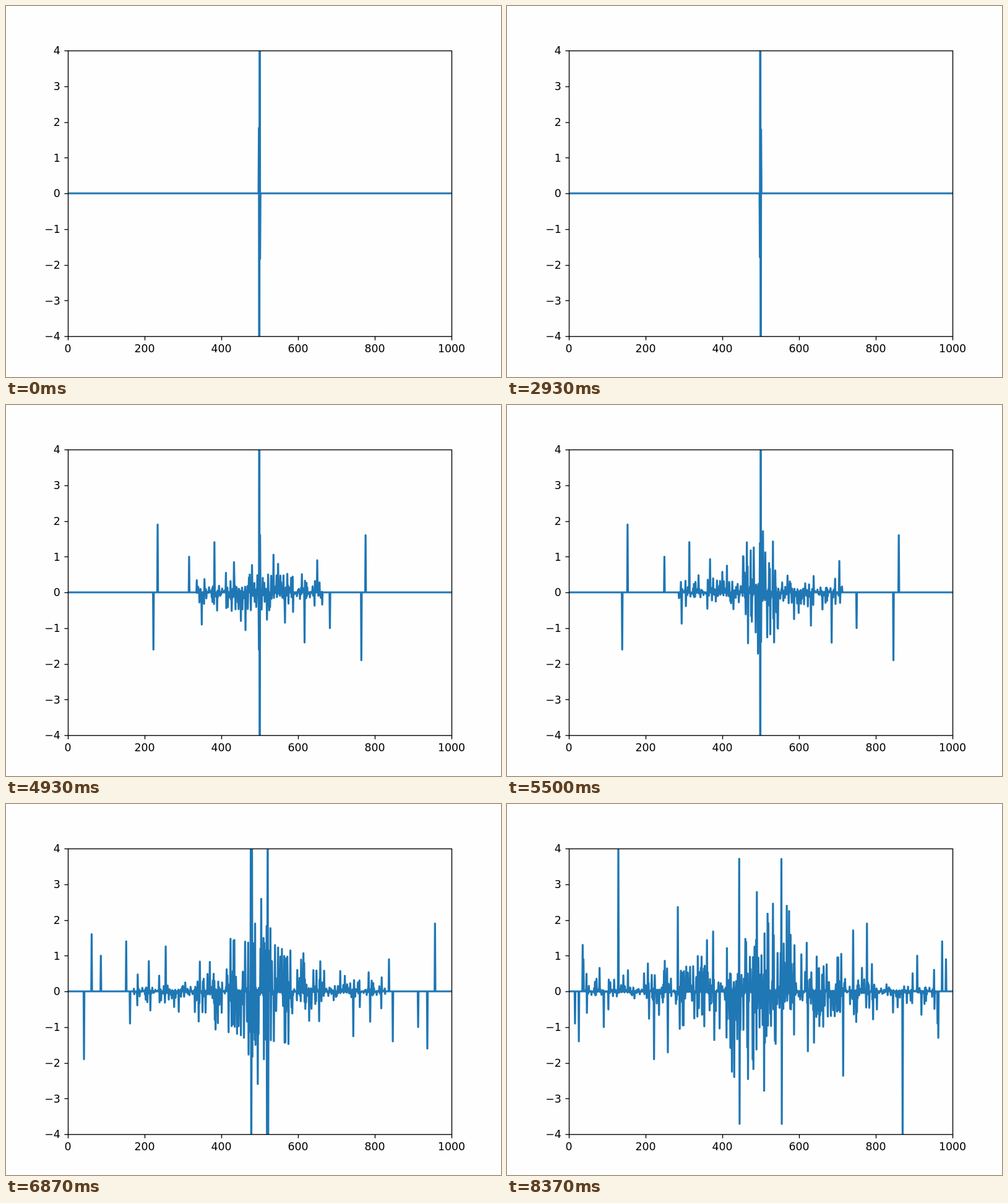
Recreate the animation shown at these times as an HTML page. Size 800 by 600 pixels, loop 8.41 s.

```html
<!DOCTYPE html>
<html lang="en">
<head>
<meta charset="utf-8">
<title>Lattice wave</title>
<style>
  html, body { margin: 0; width: 100%; height: 100%; overflow: hidden; background: #fefefe; }
  svg { display: block; width: 800px; height: 600px; }
  text { font: 17.36px "DejaVu Sans", sans-serif; fill: #000; }
  .axis { fill: none; stroke: #000; stroke-width: 1.39; }
  #wave { fill: none; stroke: #1f77b4; stroke-width: 3.2; stroke-linejoin: round; }
</style>
</head>
<body>
<svg viewBox="0 0 800 600">
  <clipPath id="plot"><rect x="100" y="72" width="620" height="462"/></clipPath>
  <g id="ticks"></g>
  <path id="wave" clip-path="url(#plot)"/>
  <rect class="axis" x="100.5" y="72.5" width="620" height="462"/>
</svg>
<script>
const LOOP = 8410, STEPS = 252, SITES = 1000;
const ONSET = 3, SPLIT = 5.9;
const px = x => 100 + x * 0.62;
const py = y => 303 - y * 57.75;
const crisp = v => Math.round(v) + 0.5;

// Pulses leave the centre at a time (s) with a speed (sites/s) and a height.
const pulses = [
  { born: 3.06, speed: 148, height: -1.6 },
  { born: 3.08, speed: 143.5, height: 1.9 },
  { born: 3.38, speed: 97, height: -0.9 },
  { born: 3.39, speed: 119, height: 1 },
  { born: 3.94, speed: 119, height: 1.4 },
  { born: 4.35, speed: 115, height: 0.9 },
  { born: 5.19, speed: 146, height: 1.3 },
  { born: 6.71, speed: 168, height: -1.9 },
  { born: 6.78, speed: 234, height: 4.1 }
];

function random(n) {
  const s = Math.sin(n * 12.9898 + 78.233) * 43758.5453;
  return s - Math.floor(s);
}

function wave(step) {
  const t = step / 30;
  const y = new Float64Array(SITES);
  // The lattice is a ring, and its right half is the left half turned by 180 degrees.
  const add = (site, height) => {
    const i = ((Math.round(site) % SITES) + SITES) % SITES;
    y[i] += height;
    y[SITES - 1 - i] -= height;
  };

  // Noise spreads from the centre, alternating in sign from site to site.
  const age = Math.max(0, t - ONSET);
  const reach = Math.min(500, 85 * age);
  for (let d = 0; d < reach; d++) {
    const u = random(d - 3 * step);
    const core = (1 + 0.4 * age) * Math.exp(-d / (30 + 18 * age)) * u ** 4;
    const stray = 0.12 * age * u ** 16;
    add(499 - d, (d % 2 ? 1 : -1) * (core + stray));
  }

  for (const { born, speed, height } of pulses) {
    const distance = speed * (t - born);
    if (distance > 8) add(500 - distance, height);
  }

  // The central oscillation later splits into two that drift apart.
  const swing = Math.cos(1.6803 * step);
  if (t < SPLIT) {
    add(499, -11 * swing);
    add(498, 11 / 6 * swing);
  } else {
    const size = Math.sign(swing) * (6 - (t - SPLIT));
    const centre = 499 - 22 * (t - SPLIT);
    add(centre, -size);
    add(centre - 1, size);
  }
  return y;
}

function drawTicks() {
  let markup = "";
  for (let x = 0; x <= 1000; x += 200) {
    markup += `<path class="axis" d="M${crisp(px(x))} 534.5v6.08"/><text x="${px(x)}" y="560" text-anchor="middle">${x}</text>`;
  }
  for (let y = -4; y <= 4; y++) {
    const label = String(y).replace("-", "\u2212");
    markup += `<path class="axis" d="M100.5 ${crisp(py(y))}h-6.08"/><text x="87.9" y="${Math.round(py(y) + 6.3)}" text-anchor="end">${label}</text>`;
  }
  document.getElementById("ticks").innerHTML = markup;
}

const line = document.getElementById("wave");
let shown = -1;

function render(ms) {
  const step = Math.min(STEPS - 1, Math.floor((ms % LOOP + 5) * 0.03));
  if (step === shown) return;
  shown = step;
  const points = Array.from(wave(step), (y, x) => `${px(x).toFixed(2)} ${py(y).toFixed(2)}`);
  line.setAttribute("d", "M" + points.join("L") + "L720 303");
}

drawTicks();
render(0);
const start = performance.now();
function tick() {
  render(performance.now() - start);
  requestAnimationFrame(tick);
}
requestAnimationFrame(tick);
</script>
</body>
</html>
```
